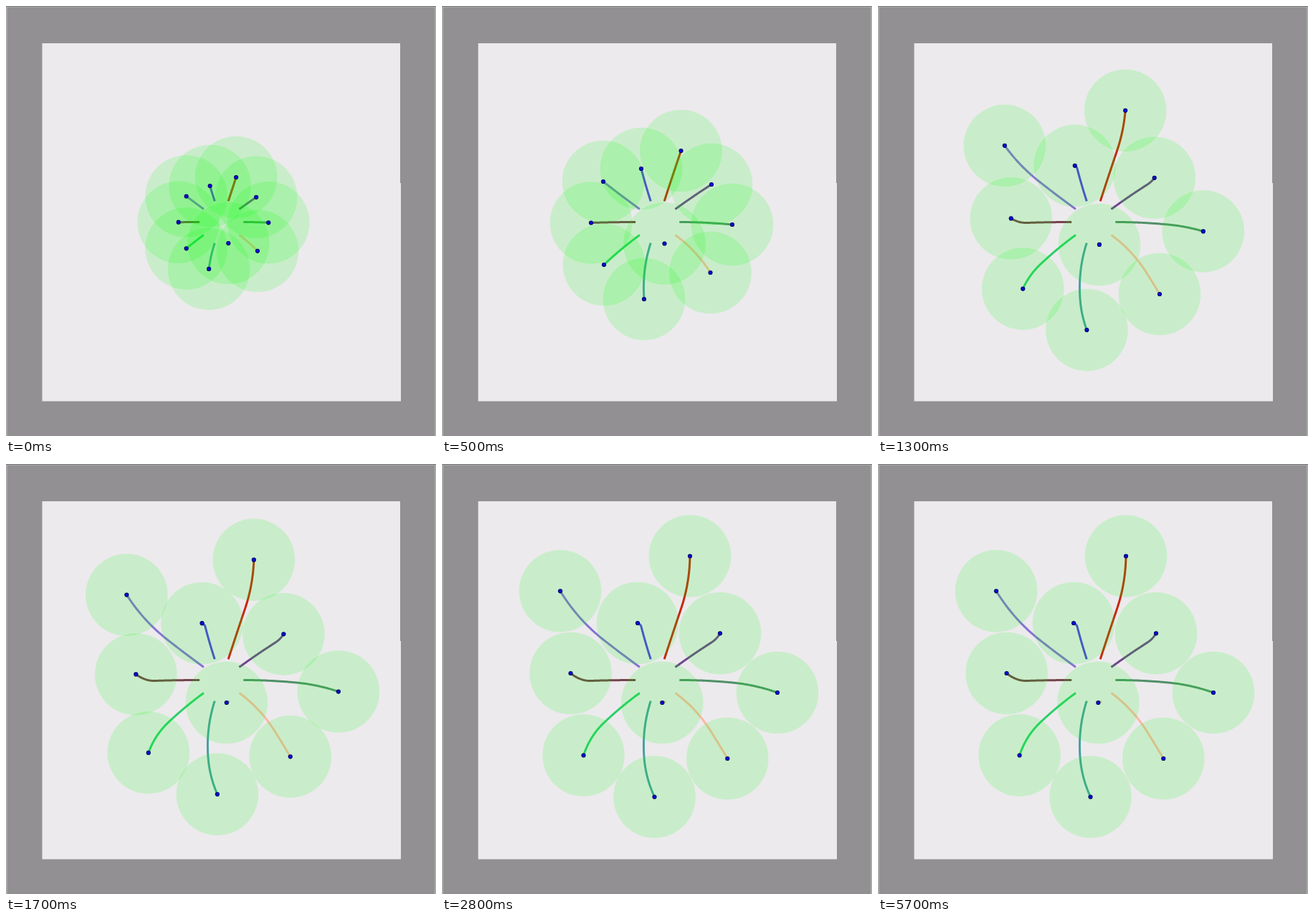
Animation of 600 by 600 pixels, one loop 5900 ms. Source, as an HTML page with a canvas:

```html
<!DOCTYPE html>
<html lang="en">
<head>
<meta charset="utf-8">
<title>Spreading agents</title>
<style>
html, body { margin: 0; width: 100%; height: 100%; overflow: hidden; background: #929092; }
canvas { display: block; width: 600px; height: 600px; }
</style>
</head>
<body>
<canvas id="stage" width="600" height="600"></canvas>
<script>
const ctx = document.getElementById('stage').getContext('2d');
const LOOP = 5900, STEP = 100, LAST = 5700;
const BEGIN = -450, TURN = 500, REST = 2400;
const CENTER = [300.7, 301.5], RING = 30.6, RADIUS = 57.3;

// Trail colour, place at TURN and place at REST; 36 degrees apart, clockwise from the right.
const AGENTS = [
  ['#509068', [405, 305], [468, 319]],
  ['#fbb8a2', [374.5, 372], [398.3, 411]],
  ['#d2bd78', [310.5, 331.5], [307.3, 333]],
  ['#48a0a0', [282, 409], [296.5, 464.5]],
  ['#2ccf68', [226, 361], [197.5, 406.5]],
  ['#74444a', [208, 302.5], [179.5, 292]],
  ['#8474d2', [225, 245], [165, 177.3]],
  ['#4f40e2', [278, 227], [273, 222]],
  ['#c42a0c', [333.5, 202], [346, 128.5]],
  ['#70468c', [376, 249], [388, 236.3]]
].map(([color, turn, rest], i) => {
  const a = i * Math.PI / 5;
  const out = [Math.cos(a), Math.sin(a)];
  const first = leg(ahead(CENTER, out, RING), out, turn);
  const second = leg(turn, [turn[0] - first[1][0], turn[1] - first[1][1]], rest);
  return { color, first, second };
});

function ahead([x, y], [dx, dy], dist) {
  const k = dist / Math.hypot(dx, dy);
  return [x + dx * k, y + dy * k];
}

// A quadratic curve that leaves its first point in a given direction.
function leg(from, dir, to) {
  const half = Math.hypot(to[0] - from[0], to[1] - from[1]) / 2;
  return [from, ahead(from, dir, half), to];
}

function along([p, q, r], u) {
  const v = 1 - u;
  return [0, 1].map(k => v * v * p[k] + 2 * u * v * q[k] + u * u * r[k]);
}

// Steady at first, then easing to rest.
function place({ first, second }, t) {
  if (t < TURN) return along(first, (t - BEGIN) / (TURN - BEGIN));
  const u = Math.min(1, (t - TURN) / (REST - TURN));
  return along(second, 1 - (1 - u) ** 2.7);
}

function box(color, x, y, w, h) {
  ctx.fillStyle = color;
  ctx.fillRect(x, y, w, h);
}

function disc([x, y], r, color) {
  ctx.fillStyle = color;
  ctx.beginPath();
  ctx.arc(x, y, r, 0, 2 * Math.PI);
  ctx.fill();
}

function room() {
  box('#aaa9aa', 0, 0, 600, 600);
  box('#929092', 2, 2, 596, 598);
  box('#777577', 0, 0, 600, 1);
  box('#eceaed', 50.5, 52, 499.5, 499.5);
  box('#eceaed', 550, 247, 1, 304.5);
}

function trail(agent, t) {
  ctx.strokeStyle = agent.color;
  ctx.lineWidth = 3;
  ctx.lineJoin = 'round';
  ctx.beginPath();
  for (let s = BEGIN; s <= Math.min(t, REST); s += 25) ctx.lineTo(...place(agent, s));
  ctx.stroke();
}

function dot(p) {
  disc(p, 3.1, '#00005a');
  disc(p, 2.3, '#0a0ad0');
}

function draw(t) {
  const spots = AGENTS.map(a => place(a, t));
  room();
  AGENTS.forEach(a => trail(a, t));
  spots.forEach(p => disc(p, RADIUS, 'rgba(0, 255, 0, 0.15)'));
  spots.forEach(dot);
}

const origin = performance.now();
function tick() {
  const t = (performance.now() - origin) % LOOP;
  draw(Math.min(LAST, Math.floor(t / STEP) * STEP));
  requestAnimationFrame(tick);
}
tick();
</script>
</body>
</html>
```
